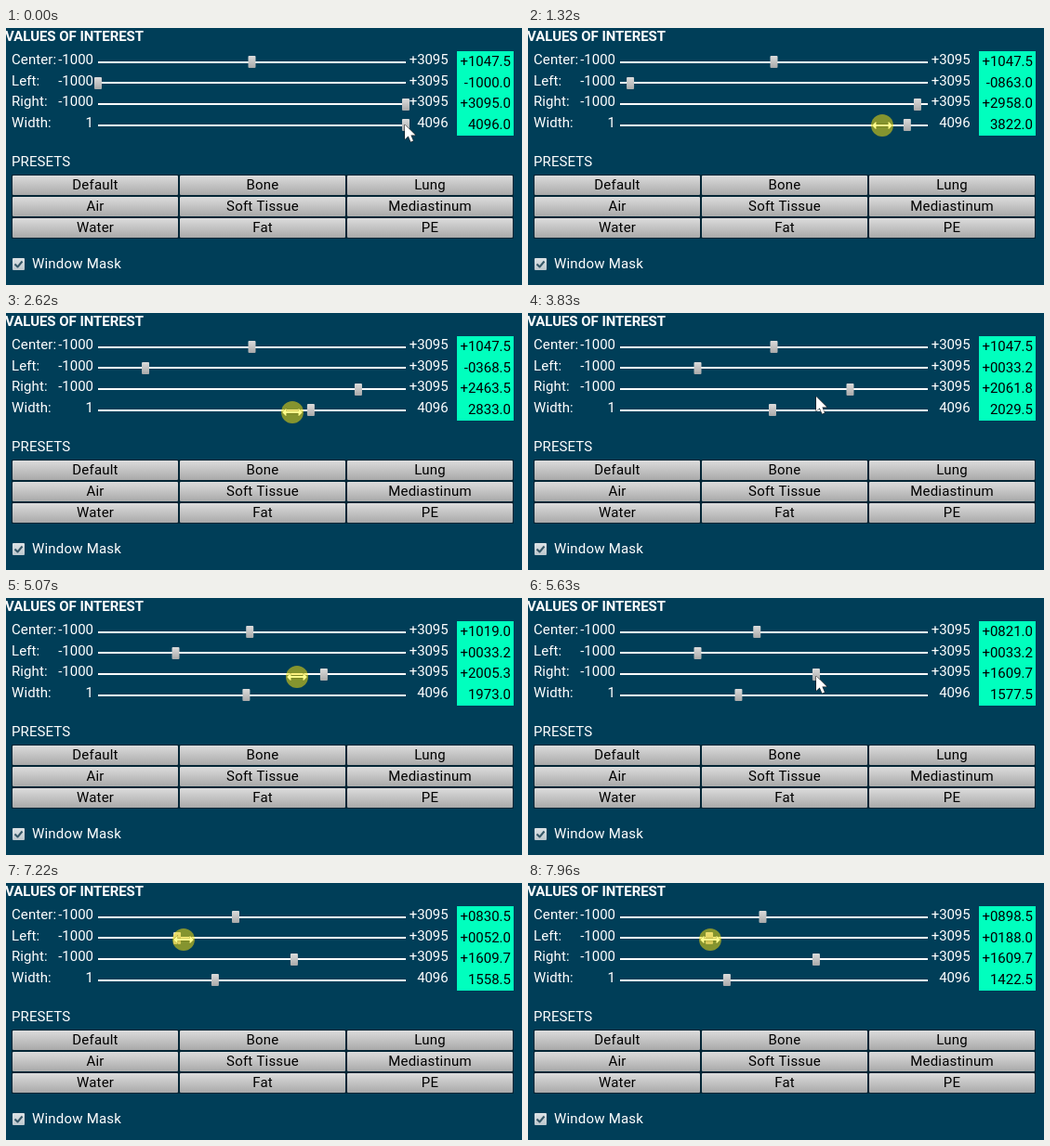
Recreate the animation shown at these times as an HTML page with a canvas. Size 555 px wide and 277 px high, loop 8 s.

```html
<!DOCTYPE html>
<html lang="en">
<head>
<meta charset="utf-8">
<title>Values of interest</title>
<style>
  html, body { margin: 0; width: 100%; height: 100%; overflow: hidden; background: #003e58; }
  canvas { display: block; }
</style>
</head>
<body>
<canvas id="stage" width="555" height="277"></canvas>
<script>
const ctx = document.getElementById('stage').getContext('2d');
const LOOP = 8000, TICK = 100, TICK_OFFSET = 20;
const MIN = -1000, MAX = 3095;
const TRACK_X = 99, TRACK_W = 331, ROW_PITCH = 22.67;

// Drags of the width, right and left sliders, in that order
const drags = [[100, 3420], [4320, 5620], [6520, LOOP]];

// Ends of the strokes: [time, value, ...]
const leftPath = [[120, MIN], [1320, -863], [2620, -368.5], [3020, -246], [3420, 33.2],
                  [6520, 33.2], [7220, 52], [7920, 188]];
const rightPath = [[4320, 2061.8], [5020, 2005.3], [5620, 1609.7]];
const pointerPath = [[220, 429, 104], [1320, 381, 105], [2620, 308, 107], [3420, 264, 107],
                     [3820, 310, 90], [4320, 346, 83], [5020, 313, 85], [5620, 310, 84],
                     [6420, 188, 67], [6520, 184, 60], [7920, 196, 61]];

// Every stroke slows down a little towards its end.
const ease = k => 1 - (1 - k) ** 1.35;

function follow(path, t) {
  const next = path.findIndex(key => key[0] > t);
  if (next <= 0) return path.at(next).slice(1);
  const [t0, ...from] = path[next - 1], [t1, ...to] = path[next];
  const k = ease((t - t0) / (t1 - t0));
  return from.map((v, i) => v + (to[i] - v) * k);
}

const rowY = (base, row) => Math.round(base + row * ROW_PITCH);
const floorHalf = v => Math.floor(v * 2 + 0.001) / 2;
const signed = v => (v < 0 ? '-' : '+') + Math.abs(v).toFixed(1).padStart(6, '0');

function text(str, x, y, { align = 'left', color = '#fff', weight = 400, spacing = 0 } = {}) {
  ctx.font = `${weight} 15px Roboto, sans-serif`;
  ctx.letterSpacing = spacing + 'px';
  ctx.textAlign = align;
  ctx.fillStyle = color;
  ctx.fillText(str, x, y);
}

function bevel(x, y, w, h, top = '#dcdcdc', bottom = '#a9a9a9') {
  const fill = ctx.createLinearGradient(0, y, 0, y + h);
  fill.addColorStop(0, top);
  fill.addColorStop(1, bottom);
  ctx.fillStyle = fill;
  ctx.beginPath();
  ctx.roundRect(x, y, w, h, 1);
  ctx.fill();
}

function polygon(x, y, points, fill, stroke) {
  ctx.beginPath();
  points.forEach(([px, py]) => ctx.lineTo(x + px, y + py));
  ctx.closePath();
  ctx.lineWidth = 1;
  ctx.lineJoin = 'round';
  ctx.strokeStyle = stroke;
  ctx.fillStyle = fill;
  ctx.stroke();
  ctx.fill();
}

function drawSlider(row, label, min, max, fraction, value) {
  const y = rowY(39, row);
  text(label, 6, y, { spacing: 0.1 });
  text(min, 94, y, { align: 'right' });
  text(max, 475.5, y, { align: 'right', spacing: -0.1 });
  ctx.fillStyle = '#fff';
  ctx.fillRect(TRACK_X, rowY(35.8, row), TRACK_W, 2);
  bevel(TRACK_X - 4 + TRACK_W * fraction, rowY(30.4, row), 8, 13);
  text(value, 543, rowY(41, row), { align: 'right', color: '#000' });
}

function drawPresets() {
  text('PRESETS', 6, 149, { spacing: 0.1 });
  const names = ['Default', 'Bone', 'Lung', 'Air', 'Soft Tissue', 'Mediastinum', 'Water', 'Fat', 'PE'];
  names.forEach((name, i) => {
    const x = 6 + i % 3 * 180, y = 158 + Math.floor(i / 3) * 23;
    ctx.fillStyle = 'rgba(0, 0, 0, 0.4)';
    ctx.fillRect(x, y, 180, 23);
    bevel(x + 1, y + 1, 178, 21);
    text(name, x + 90, y + 16, { align: 'center', color: '#000', spacing: 0.2 });
  });
}

function drawCheckbox() {
  bevel(7, 248, 13, 13, '#dde3e6', '#bcc7cd');
  ctx.strokeStyle = '#365868';
  ctx.lineWidth = 2;
  ctx.beginPath();
  ctx.moveTo(9.5, 254.5);
  ctx.lineTo(12.5, 257.5);
  ctx.lineTo(17.5, 251.5);
  ctx.stroke();
  text('Window Mask', 28, 259, { spacing: 0.2 });
}

function drawPointer(t) {
  const [x, y] = follow(pointerPath, t).map(Math.round);
  const dragging = drags.some(([from, to]) => t >= from && t < to);
  if (dragging) {
    ctx.fillStyle = 'rgba(255, 228, 10, 0.52)';
    ctx.beginPath();
    ctx.arc(x, y, 12, 0, 2 * Math.PI);
    ctx.fill();
  }
  if (dragging && t > 400) {
    const half = [[-11, 0], [-6.5, -4.5], [-6.5, -1], [6.5, -1], [6.5, -4.5]];
    polygon(x, y, [...half, ...half.map(([px, py]) => [-px, -py])], '#ffff8c', 'rgba(90, 90, 0, 0.5)');
  } else {
    polygon(x, y, [[0, 0], [0, 16], [3.7, 12.6], [6.4, 18.7], [9, 17.6], [6.4, 11.6], [11.5, 11.4]], '#fff', '#111');
  }
}

function draw(t) {
  const [left] = follow(leftPath, t);
  // The width slider moves both ends symmetrically.
  const right = t < drags[0][1] ? MIN + MAX - left : follow(rightPath, t)[0];
  const center = (left + right) / 2;
  const span = right - left;
  const fraction = v => (v - MIN) / (MAX - MIN);

  ctx.fillStyle = '#003e58';
  ctx.fillRect(0, 0, 555, 277);
  text('VALUES OF INTEREST', -1, 14, { weight: 700, spacing: -0.05 });
  ctx.fillStyle = '#00ffbe';
  ctx.fillRect(485, 25, 61, 91);
  drawSlider(0, 'Center:', '-1000', '+3095', fraction(center), signed(floorHalf(center)));
  drawSlider(1, 'Left:', '-1000', '+3095', fraction(left), signed(left));
  drawSlider(2, 'Right:', '-1000', '+3095', fraction(right), signed(right));
  drawSlider(3, 'Width:', '1', '4096', span / (MAX - MIN), floorHalf(span + 1).toFixed(1));
  drawPresets();
  drawCheckbox();
  drawPointer(t);
}

// The screen is refreshed in steps, not continuously.
const snap = t => Math.max(0, Math.floor((t - TICK_OFFSET) / TICK) * TICK + TICK_OFFSET);

const start = performance.now();
function frame() {
  draw(snap((performance.now() - start) % LOOP));
  requestAnimationFrame(frame);
}
frame();
</script>
</body>
</html>
```
